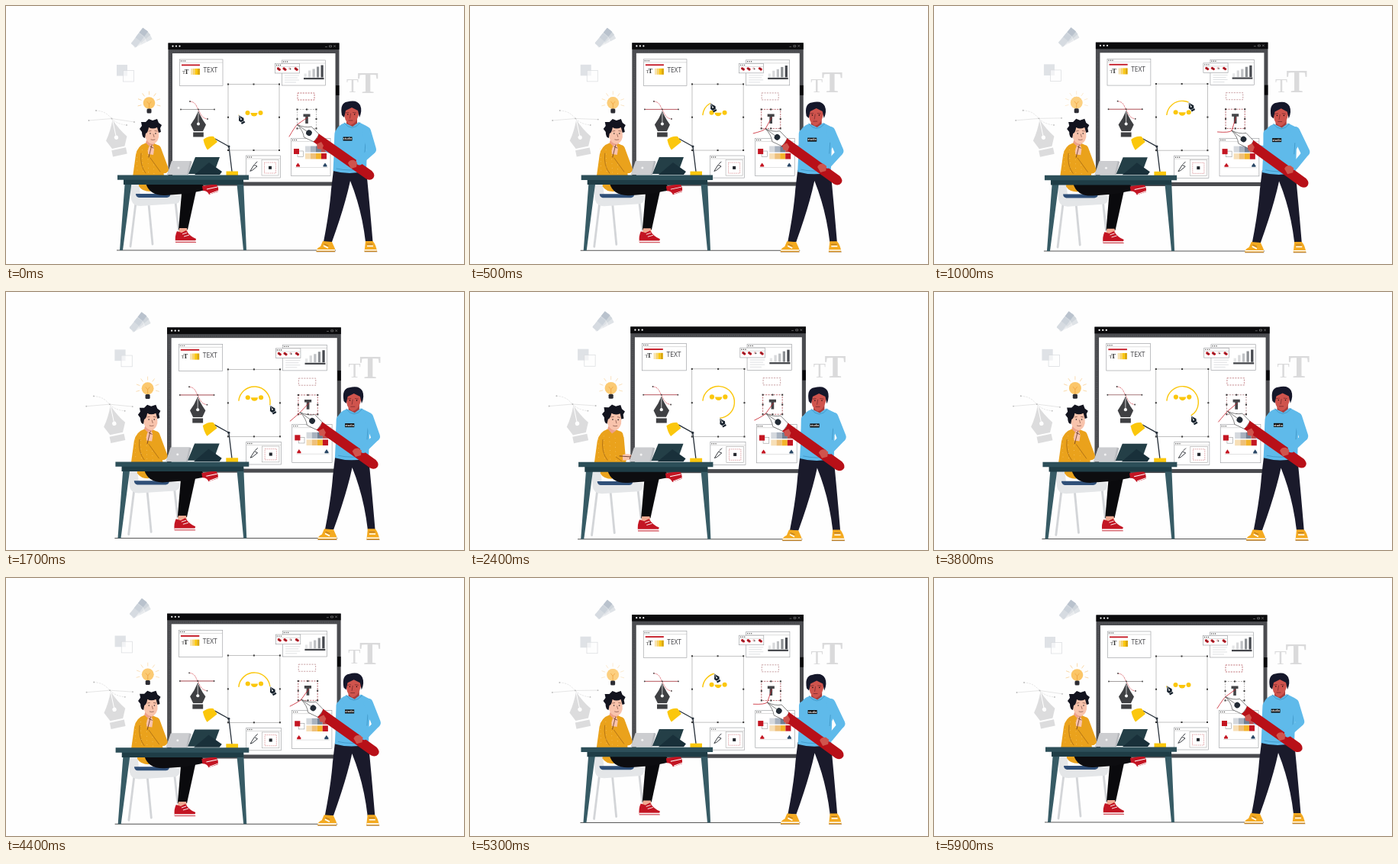
Recreate the animation shown at these times as an HTML page. Size 600 px wide and 338 px high, loop 6 s.

```html
<!DOCTYPE html>
<html lang="en">
<head>
<meta charset="utf-8">
<title>Design studio</title>
<style>
html, body { margin: 0; width: 100%; height: 100%; overflow: hidden; background: #fefefe; }
svg { display: block; width: 600px; height: 338px; }
.serif { font-family: "Liberation Serif", serif; }
.sans { font-family: "Open Sans", sans-serif; }
.panel { fill: #fff; stroke: #96989c; stroke-width: .6; }
.line { fill: none; stroke-linecap: round; stroke-linejoin: round; }
</style>
</head>
<body>
<svg viewBox="0 0 600 338">
<defs>
  <g id="nib">
    <path d="M0 0Q4 10 10 18L6 26.500H-6L-10 18Q-4 10 0 0Z"/><rect x="-6.800" y="28" width="13.600" height="6"/>
  </g>
</defs>
<g id="zoom">
  <!-- floating tools -->
  <g id="fan"></g>
  <rect x="145" y="77" width="14" height="14.5" fill="#dfe2e6"/>
  <rect x="153.500" y="84.500" width="14" height="14.500" fill="#fff" fill-opacity=".6" stroke="#d9dbde" stroke-width=".7"/>
  <g fill="#dadadb" class="serif">
    <text x="446" y="113" font-size="26">T</text>
    <text x="460.5" y="113.5" font-size="41" font-weight="bold">T</text>
  </g>
  <g class="line" stroke="#d5d5d5" stroke-width=".6">
    <path id="ghostLine"/>
    <path d="M118 137C130 138 133 142 138 147S148 155 158 156" stroke-dasharray="1.5 2"/>
  </g>
  <g id="ghostDots" fill="#bbb"></g>
  <g transform="translate(139.500 149) rotate(-12) scale(1.4)">
    <use href="#nib" fill="#dcdcdd"/>
    <path d="M0 1V17" stroke="#fff" stroke-width=".7"/><circle cy="17" r="1.900" fill="#fff"/>
  </g>

  <!-- board -->
  <rect x="212.5" y="48.5" width="224" height="187" fill="#4a4b4f"/>
  <rect x="212.5" y="48.5" width="224" height="8.5" fill="#0b0b0d"/>
  <path d="M215 59.700H433M215.300 62V231" stroke="#58595d" stroke-width="2" stroke-dasharray=".6 2"/>
  <rect x="218" y="62" width="213.5" height="168.5" fill="#fff"/>
  <rect x="432" y="104" width="4.5" height="13" fill="#08080a"/>
  <g fill="#fff"><circle cx="218.5" cy="52.6" r="1.1"/><circle cx="223" cy="52.6" r="1.1"/><circle cx="227.5" cy="52.6" r="1.1"/></g>
  <path class="line" stroke="#aaa" stroke-width=".5" d="M418.500 53.500H420.500M424 51.800H426.500V53.800H424ZM429.500 51.600L431.500 53.600M431.500 51.600L429.500 53.600"/>
  <g id="windows"></g>

  <rect x="230" y="76.500" width="24" height="1.800" fill="#c41622"/>
  <g class="serif" fill="#333"><text x="231" y="88.500" font-size="6.500">T</text><text x="233.700" y="88.500" font-size="8.500" font-weight="bold">T</text></g>
  <text class="sans" x="258.500" y="87" font-size="8.300" fill="#3b3b3f">TEXT</text>
  <g id="swatches"></g>

  <g id="bars"></g>
  <rect x="390" y="94" width="26.500" height="2.200" fill="#44464b"/>
  <path d="M365 91H384M365 94H382M365 97H384M365 100H380" stroke="#dcdee0" stroke-width=".9"/>
  <g id="combos"></g>

  <!-- small tool window -->
  <path class="line" d="M320 216L325 208 329 210 323 215ZM326 207L329 204" stroke="#24282e" stroke-width=".9"/>
  <rect x="338.5" y="205" width="15" height="14" fill="none" stroke="#cf6a70" stroke-width=".6" stroke-dasharray="1.5 1"/>
  <rect x="335" y="201.500" width="22" height="20.500" fill="none" stroke="#999" stroke-width=".5"/>
  <rect x="344" y="209.800" width="4" height="4" fill="#24282e"/>

  <!-- colour window -->
  <rect x="382" y="190" width="7.500" height="7.500" fill="#fff" stroke="#999" stroke-width=".6"/>
  <rect x="377" y="187" width="7" height="7" fill="#c41622"/>
  <path d="M379 211.500H422" stroke="#d5d5d5" stroke-width=".7"/>
  <path d="M380 209L382.500 205.500 385 209V210.500H380Z" fill="#c41622"/>
  <path d="M415.500 209L418 205.500 420.500 209V210.500H415.500Z" fill="#294766"/>

  <!-- bezier tool -->
  <g class="line" stroke-width=".7">
    <path d="M229 135.500H273" stroke="#777"/>
    <path id="handle" d="M229 135.500H273" stroke="#d6505a"/>
    <path d="M241 125C249 126 249 131 252 136S256 147 264 148" stroke="#d6505a" stroke-dasharray="2 1.400"/>
  </g>
  <g id="bezierDots" fill="#444"></g>
  <g transform="translate(252 137.500)"><use href="#nib" fill="#3f4043"/><path d="M0 2V17" stroke="#fff" stroke-width=".7"/><circle cy="17" r="2" fill="#fff"/></g>

  <!-- smiley artboard -->
  <g id="artboard"></g>
  <g id="face" fill="#fbc70c"><circle cx="316.500" cy="139" r="3"/><circle cx="333.500" cy="139" r="3"/><path d="M320.500 139H329.500A4.500 4.500 0 0 1 320.500 139Z"/></g>
  <circle id="arc" r="20.300" pathLength="360" transform="translate(325 145) rotate(185)" fill="none" stroke="#fbc70c" stroke-width="1.400"/>
  <g id="cursor"><use href="#nib" fill="#16212c"/><path d="M0 0V16" stroke="#fff" stroke-width="1.500"/><circle cy="17" r="2.500" fill="#fff"/></g>

  <!-- type box -->
  <rect x="382" y="114" width="22" height="9" fill="none" stroke="#aaa" stroke-width=".6" stroke-dasharray="2 1.400"/>
  <rect id="redBox" x="382" y="114" width="22" height="9" fill="none" stroke="#d6505a" stroke-width=".6" stroke-dasharray="2 1.400"/>
  <g id="typeBox"></g>
  <path d="M389.500 141.500H398.500V145H395.800V154H392.200V145H389.500Z" fill="#444548"/>
  <path id="stroke" class="line" stroke="#c8202c" stroke-width=".8"/>

  <!-- idea -->
  <g id="rays" class="line" stroke="#f8cc8c" stroke-width=".7"></g>
  <circle cx="187.500" cy="127" r="7.800" fill="#fbc566"/>
  <circle id="glow" cx="187.500" cy="127" r="7.800" fill="#fdd793"/>
  <path class="line" d="M185 125.500L187.500 128.500 190 125.500M187.500 128.500V134" stroke="#eb9630" stroke-width=".6"/>
  <rect x="184.500" y="134.500" width="6" height="6" rx="1.500" fill="#2c2c33"/>

  <!-- chair -->
  <path d="M145 320H432" stroke="#444" stroke-width=".9"/>
  <g class="line" stroke="#d3d5d8" stroke-width="2.800"><path d="M170 258L163 315M187 260L192 312M222 257L226 293"/></g>
  <path d="M162 231H174L176 247 228 248Q230 258 222 259L176 262Q165 262 164 252Z" fill="#e4e6e8"/>
  <path d="M170 246H215Q216 250 211 251H174Q170 250 170 246Z" fill="#2f4f78"/>

  <!-- seated designer -->
  <path d="M174 230H190L189 243Q178 243 174 236Z" fill="#eaa21c"/>
  <path d="M241 234L250 238 238 293H226L230 246Z" fill="#0a0a0d"/>
  <path d="M183 232Q188 249 209 248L236 246 262 241 257 233Z" fill="#0d0d10"/>
  <path d="M227 291H237L238 297H226Z" fill="#f0aa92"/>
  <path d="M224 295L230 297 236 294Q241 302 249 305L248 309H222Q221 301 224 295Z" fill="#c31523"/>
  <path d="M222 308H249" stroke="#fff" stroke-width="1.600"/><path d="M222 309.500H249" stroke="#c31523" stroke-width=".8"/>
  <path d="M231 299L237 297M233 302L240 300" stroke="#fff" stroke-width=".9"/>
  <path d="M257 236L275 233Q279 237 278 243L266 247Q264 242 258 242Z" fill="#c31523"/>
  <path d="M263 240L277 237M267 246L278 242" stroke="#fff" stroke-width="1"/>
  <path d="M184 179Q172 183 170 195L166 224H207L204 190Q201 182 194 180Z" fill="#eaa21c"/>
  <path class="line" d="M177 193Q175 209 183 219M199 188L202 198" stroke="#8f5813" stroke-width=".6"/>
  <g id="dots" fill="#fbd58c"></g>
  <g id="thinker">
    <path d="M185 173L194 175 194 181 189 185 183 179Z" fill="#eda18a"/>
    <path d="M182 162Q183 156 191 155T200 160V172Q198 180 192 181 185 180 182 171Z" fill="#f8c3ac"/>
    <path d="M182 173Q178 172 178 165L175 161 178 157 177 152 183 152 187 148 192 150 198 148 200 153 204 156 202 160 203 165 200 166 198 159Q192 162 187 159 186 166 183 167Z" fill="#13141f"/>
    <circle cx="189" cy="167" r=".8" fill="#222"/><circle cx="196" cy="167" r=".8" fill="#222"/>
    <path class="line" d="M187 164L190 163.500M195 163.500L198 164M193 168L194 171.500M190 175Q192 176 195 175" stroke="#6b3a30" stroke-width=".6"/>
  </g>
  <path id="armOuter" class="line" stroke="#eaa21c" stroke-width="10"/>
  <path id="armInner" class="line" stroke="#eaa21c" stroke-width="8"/>
  <path id="armFold" class="line" stroke="#8f5813" stroke-width=".6"/>
  <g id="hand"><path d="M-4 6Q-5 -2 -1 -6 4 -7 4 0L3 7Z" fill="#f8c3ac"/><path class="line" d="M-1 -4L3 -2M1 -6L-3 10" stroke="#65352a" stroke-width=".8"/></g>

  <!-- desk -->
  <path class="line" d="M296 217L292 184 274 174" stroke="#27303a" stroke-width="1.300"/>
  <circle cx="292" cy="184" r="1.500" fill="#27303a"/>
  <path d="M258.500 175Q265 170 272 171L277 178 264 188.500Q260 183 258.500 175Z" fill="#fbc70c"/>
  <path d="M288.500 216.500H304V222H288.500Z" fill="#fbc70c"/>
  <path d="M218 203H242Q244 203 243.500 205L239 221H211Z" fill="#b8babe"/><path d="M217 203H241L237 221H211Z" fill="#cccdd0"/>
  <circle cx="226" cy="212" r="1.500" fill="#f3f3f3"/>
  <path d="M248 198H280L272 220H239Z" fill="#243f47"/><path d="M266 205L283 217 280 221H247Z" fill="#19303a"/>
  <path d="M156 228H165L153 320H149ZM302 228H311L315 320H311Z" fill="#375b65"/>
  <path d="M154 227H311V234H154Z" fill="#1f3d46"/>
  <path d="M146 221.500H318V227.800H146Z" fill="#2d4f59"/>

  <!-- standing designer -->
  <path d="M429 215H472Q476 255 480.500 309H471Q466 266 451 229 444 262 427 309H416Q424 268 426 240Z" fill="#1a1a2b"/>
  <g id="shoes"></g>
  <g id="torso">
    <path d="M446 147H460V160H446Z" fill="#a93c3b"/>
    <path d="M444 153Q434 156 431 166L428.500 216Q450 222 472 216L473 186 478 176Q478 160 472 157L462 152 454 158Z" fill="#5fbaea"/>
    <path class="line" d="M443 153Q453 166 464 153M435 176L434 197M471 178L470 192M433 213Q450 217 469 213" stroke="#3187b8" stroke-width=".6"/>
    <path d="M443 136Q442 151 451 156 461 154 463 136Q452 128 443 136Z" fill="#cf544d"/>
    <path d="M440 143Q437 127 447 125.500 460 122 464 130 467 137 463 146L461 137 453 133 445 137 443 146Z" fill="#15172a"/>
    <path class="line" d="M445 140L449 139.500M454.500 139.500L458.500 140M451.500 141L450.500 147M449 150H454" stroke="#6e252a" stroke-width=".7"/>
    <circle cx="447.800" cy="142" r=".7"/><circle cx="456.700" cy="142" r=".7"/>
    <rect x="441.500" y="171.500" width="12" height="5" fill="#111"/>
    <text class="sans" x="447.500" y="175.300" font-size="3.600" font-weight="bold" text-anchor="middle" fill="#fff">studio</text>
  </g>
  <path id="sleeveLeft" class="line" stroke="#5fbaea" stroke-width="11"/>
  <path id="sleeveRight" class="line" stroke="#5fbaea" stroke-width="12"/>
  <g id="pen">
    <path d="M0 0Q11 -2 17 -8.500L31 -6V6L17 8.500Q11 2 0 0Z" fill="#fff" stroke="#444" stroke-width=".6"/>
    <path d="M0 0H18" stroke="#444" stroke-width=".6"/><circle cx="19" r="3.800" fill="#222b35"/>
    <path d="M30 -6.400H115Q122 -5 122 0T115 6.400H30Q33 0 30 -6.400Z" fill="#b81018"/>
  </g>
  <path id="foreRight" class="line" stroke="#5fbaea" stroke-width="9"/>
  <path id="grip" d="M-6 -1Q-4 -6 2 -5L6 -2 5 4 -2 6Z" fill="#cf544d"/>
  <path id="gripTop" d="M-4 -2L2 -5 5 0 3 5 -3 4Z" fill="#cf544d"/>
</g>
</svg>
<script>
const $ = id => document.getElementById(id);
const set = (id, attrs) => { for (const k in attrs) $(id).setAttribute(k, attrs[k]); };
const rect = (x, y, w, h, fill, extra = '') => `<rect x="${x}" y="${y}" width="${w}" height="${h}" fill="${fill}" ${extra}/>`;
const dot = (x, y, r = .9, fill = '') => `<circle cx="${x}" cy="${y}" r="${r}" ${fill && `fill="${fill}"`}/>`;
const win = (x, y, w, h) => rect(x, y, w, h, '#fff', 'class="panel"') +
  `<path d="M${x} ${y + 4}H${x + w}" stroke="#bbb" stroke-width=".5"/>` +
  [2, 4.5, 7].map(d => dot(x + d, y + 2, .7, '#444')).join('');
const nodes = (x, y, w, h, r) => [0, .5, 1].flatMap(u => [0, .5, 1].map(v =>
  u == .5 && v == .5 ? '' : rect(x + w * u - r, y + h * v - r, 2 * r, 2 * r, '#3a3a3a'))).join('');

// Static repeated parts
$('windows').innerHTML = win(227.5, 70, 56.5, 34.5) + win(361.5, 71, 57, 33) + win(352.5, 75.5, 32, 12.5) +
  win(314.5, 196, 45, 29) + win(373.5, 173.5, 51.5, 49);
$('swatches').innerHTML = ['#f7e3b1', '#f8d36b', '#fbc70c', '#dba70c'].map((c, i) => rect(242 + i * 3, 82, 3, 8, c)).join('') +
  ['#d5d9de', '#a8b2bf', '#718093', '#bd5150'].map((c, i) => rect(392 + i * 7, 183.5, 7, 8, c)).join('') +
  ['#f7dfb7', '#eec07b', '#f4b42b', '#c41622'].map((c, i) => rect(392 + i * 7, 193, 7, 7.5, c)).join('');
$('combos').innerHTML = [0, 1, 2, 3].map(i => {
  const x = 356.5 + i * 7.6, hollow = i == 2;
  return dot(x, 82, 1.7, hollow ? '#e9b9bb' : '#c41622') + dot(x + 1.7, 83.2, 1.7, hollow ? '#fff' : '#c41622') +
    dot(x + .9, 82.6, .8, '#333');
}).join('');
$('artboard').innerHTML = rect(291, 102.5, 67, 86.5, 'none', 'stroke="#9a9a9a" stroke-width=".6"') + nodes(291, 102.5, 67, 86.5, 1);
$('typeBox').innerHTML = rect(381.5, 135.5, 25, 25, 'none', 'stroke="#888" stroke-width=".6" stroke-dasharray="2 1.4"') +
  rect(381.5, 135.5, 25, 25, 'none', 'id="redType" stroke="#d6505a" stroke-width=".6" stroke-dasharray="2 1.4"') +
  nodes(381.5, 135.5, 25, 25, 1);
$('bezierDots').innerHTML = [[229, 135.5], [241, 125], [252, 135.5], [264, 148], [273, 135.5]].map(p => dot(...p)).join('');
$('rays').innerHTML = [-160, -125, -90, -55, -20, 15, 165].map(a =>
  `<path d="M11 0H15" transform="translate(187.500 127) rotate(${a})"/>`).join('');
$('dots').innerHTML = Array.from({ length: 24 }, (_, i) =>
  dot(171 + (i * 7.3) % 29, 187 + i * 1.4, .45)).join('');
$('shoes').innerHTML =
  `<path d="M415 308L427 309 431 318V322H406.500Q406 318 412 315Z" fill="#f4aa20"/>
   <path d="M471 308H480.500Q485 313 486 322H469.500Z" fill="#f4aa20"/>
   <path d="M407 319.800H431M470 319.800H485.500M416 314L422 317M473 314.500H481" stroke="#fff" stroke-width="1.500"/>
   <path class="line" d="M407 321.800H431M470 321.800H486M417 312L422 314M473 312H480" stroke="#8a5a30" stroke-width=".7"/>`;

const clamp = v => Math.max(0, Math.min(1, v));
const smooth = v => (v = clamp(v), v * v * (3 - 2 * v));
const mix = (a, b, k) => a + (b - a) * k;
const at = (x, y) => `translate(${x} ${y})`;

function draw(t) {
  const swell = (1 - Math.cos(t / 3000 * Math.PI)) / 2;
  const beat = Math.min(t % 2000, 2000 - t % 2000);
  const pull = smooth(beat / 800);
  const red = clamp(beat / 220 - .4);
  const typing = smooth((t - 1700) / 600) * (1 - smooth((t - 3100) / 500));

  const scale = 1 + .028 * swell;
  set('zoom', { transform: `translate(300 169) scale(${scale}) translate(-300 -169)` });

  // Smiley outline is drawn, then retraced
  const sweep = Math.max(0, 322 - 108 * Math.abs(t / 1000 - 2.97));
  const angle = (185 + sweep) * Math.PI / 180;
  set('arc', { 'stroke-dasharray': `${sweep} 400` });
  set('cursor', { transform: `translate(${325 + 20.3 * Math.cos(angle)} ${145 + 20.3 * Math.sin(angle)}) rotate(-30) scale(.37)` });
  set('face', { transform: at(0, 1 - 2 * swell) });

  // Large pen and the arms holding it
  const tipX = 381.4 + 8 * pull, tipY = 155.3 + 8 * pull;
  set('pen', { transform: `${at(tipX, tipY)} rotate(${35 + pull})` });
  set('stroke', { d: `M371 ${171 - 6 * pull}Q${tipX - 3} ${tipY + 3} ${tipX} ${tipY}L395 146` });
  set('torso', { transform: at(.6 * pull, 1.6 * pull) });
  set('sleeveLeft', { d: `M436 167L${435 + pull} 189L${423 + 3 * pull} ${187 + pull}` });
  set('sleeveRight', { d: `M472 164L${479 + 6 * pull} ${188 + 3 * pull}` });
  set('foreRight', { d: `M${479 + 6 * pull} ${190 + 3 * pull}L${463 + 8 * pull} ${204 + 6 * pull}` });
  set('grip', { transform: at(454 + 10 * pull, 207 + 7 * pull) });
  set('gripTop', { transform: at(411 + 3 * pull, 183 + 2 * pull) });

  // Thinking, then a spell of typing
  const elbowX = mix(208, 200, typing), elbowY = mix(214, 212, typing);
  const handX = mix(190, 209, typing), handY = mix(188, 215, typing);
  const wristX = mix(192, 204, typing), wristY = mix(196, 217, typing);
  set('armOuter', { d: `M198 187L${elbowX} ${elbowY}` });
  set('armInner', { d: `M${elbowX - 1} ${elbowY + 1}L${wristX} ${wristY}` });
  set('armFold', { d: `M${elbowX - 6} ${elbowY + 3}L${wristX - 3} ${wristY + 3}` });
  set('hand', { transform: `${at(handX, handY)} rotate(${80 * typing})` });
  set('thinker', { transform: `rotate(${3 * typing} 189 182)` });

  // Board details and floating tools
  set('handle', { opacity: red });
  set('redType', { opacity: red });
  set('redBox', { opacity: 1 - .5 * red });
  set('rays', { opacity: 1 - .5 * pull });
  set('glow', { opacity: .6 * pull });
  const tilt = 3 - 5 * pull;
  set('ghostLine', { d: `M108.500 150L138.500 147.500 168 ${149 + tilt}` });
  $('ghostDots').innerHTML = [[108.5, 150], [118, 137], [138.5, 147.5], [158, 156], [168, 149 + tilt]].map(p => dot(...p)).join('');
  $('bars').innerHTML = [5, 9, 11, 14, 16].map((h, i) => {
    const height = h * (1 - .06 * pull);
    return rect(390.5 + i * 5.5, 93.5 - height, 3.2, height, ['#e6e7e8', '#d8d9db', '#bfc1c4', '#8d9094', '#46494f'][i]);
  }).join('');
  $('fan').innerHTML = [64, 50, 37].map((a, i) =>
    `<g transform="translate(168 50) rotate(${a + (i - 1) * 3 * pull})">` +
    rect(-4, -24, 8.5, 26, ['#f0f1f3', '#e6e9ec', '#d6dbe1'][i], 'rx="1"') +
    rect(-4, -24, 8.5, 8, ['#dfe3e7', '#d0d6dc', '#b9c2cd'][i]) +
    rect(-4, -15, 8.5, 7, ['#e9ebee', '#dce0e5', '#cbd2da'][i]) + '</g>').join('');
}

function frame() {
  draw(performance.now() % 6000);
  requestAnimationFrame(frame);
}
frame();
</script>
</body>
</html>
```
